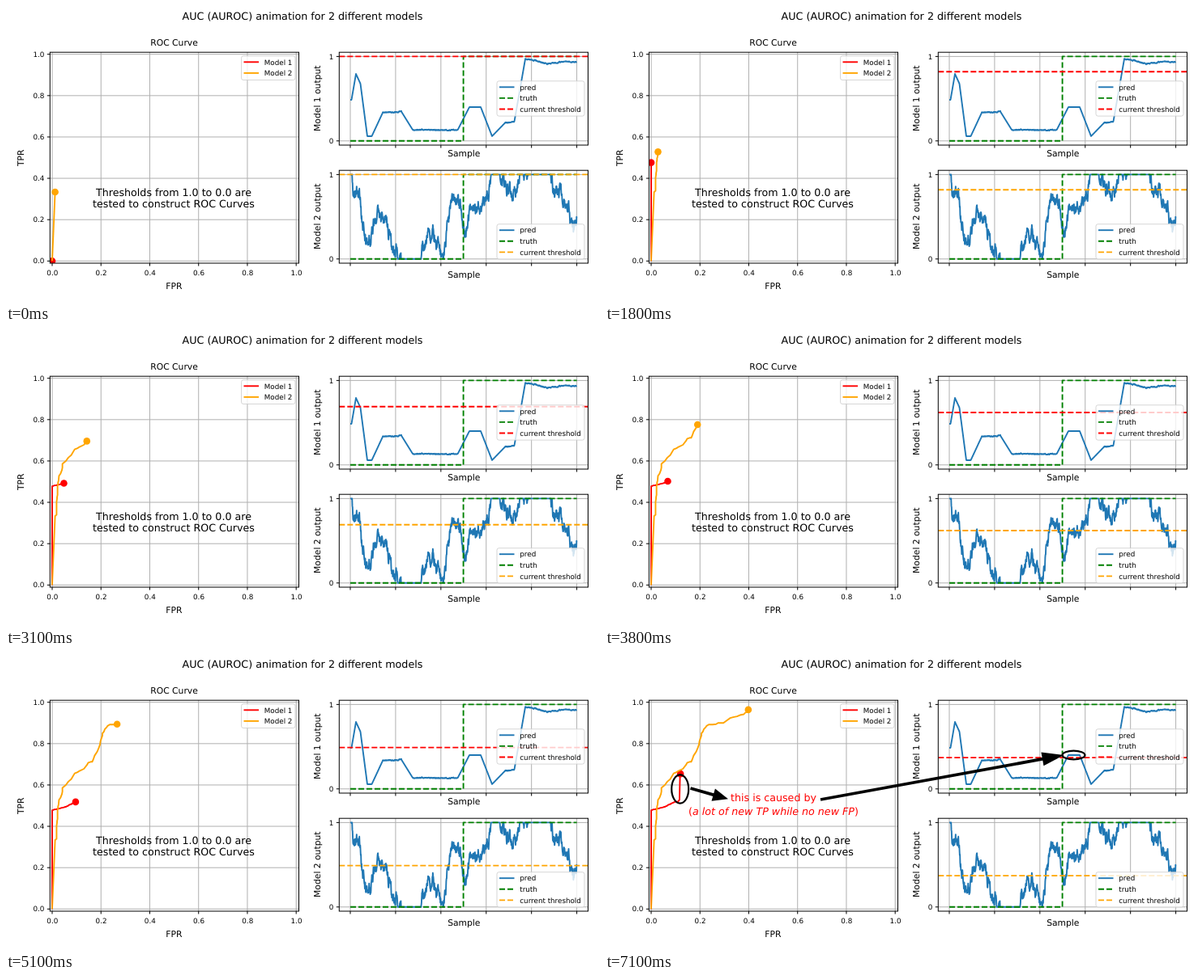
These frames come from a looping animation (732 px wide and 366 px high, 8 s). An HTML page:

```html
<!DOCTYPE html>
<html lang="en">
<head>
<meta charset="utf-8">
<title>ROC animation</title>
<style>
  html, body { margin: 0; width: 100%; height: 100%; overflow: hidden; background: #fff; }
  svg { display: block; width: 100%; height: 100%; }
  text { font-family: "DejaVu Sans", sans-serif; text-rendering: geometricPrecision; }
</style>
</head>
<body>
<svg id="stage" viewBox="0 0 732 366"></svg>
<script>
const LOOP = 8000, STEP = 100, LAST = 63;
const BLUE = '#1f77b4', GREEN = '#008000', RED = '#ff0000', ORANGE = '#ffa500';
const BIG = 12.67, MID = 10.75, SMALL = 8.75, LINE = 1.9;
const SAMPLES = 1000, X0 = 425, X1 = 704.6, UNIT = 104.4, MARGIN = 5.2;
const TOP1 = 57.2, TOP2 = 203.2;
const stage = document.getElementById('stage');

function add(tag, attrs, parent = stage) {
  const el = document.createElementNS('http://www.w3.org/2000/svg', tag);
  for (const key in attrs) el.setAttribute(key, attrs[key]);
  parent.appendChild(el);
  return el;
}

function label(str, x, y, size, extra = {}, parent = stage) {
  const el = add('text', { x, y, 'font-size': size, 'text-anchor': 'middle', ...extra }, parent);
  el.textContent = str;
  return el;
}

const upright = (str, x, y, size) =>
  label(str, 0, 0, size, { transform: `translate(${x} ${y}) rotate(-90)` });

const path = (d, stroke, width, extra = {}, parent = stage) =>
  add('path', { d, stroke, 'stroke-width': width, fill: 'none', 'stroke-linejoin': 'round', ...extra }, parent);

const toPath = pts => 'M' + pts.map(p => p[0].toFixed(2) + ' ' + p[1].toFixed(2)).join('L');
const dashes = { 'stroke-dasharray': '7 3' };
const atEnd = { 'text-anchor': 'end' };

function axes(left, top, height, xs, ys) {
  const right = left + 307.2, bottom = top + height, id = `clip${left}-${top}`;
  const box = { x: left, y: top, width: 307.2, height };
  add('rect', box, add('clipPath', { id }));
  let grid = '', ticks = '';
  for (const x of xs) { grid += `M${x} ${top}V${bottom}`; ticks += `M${x} ${bottom}v3.5`; }
  for (const y of ys) { grid += `M${left} ${y}H${right}`; ticks += `M${left} ${y}h-3.5`; }
  path(grid, '#b0b0b0', 1);
  path(ticks, '#000', 1);
  const plot = add('g', { 'clip-path': `url(#${id})` });
  add('rect', { ...box, fill: 'none', stroke: '#000' });
  return plot;
}

function legend(x, y, width, rows) {
  const height = 2.5 + rows.length * 13.6;
  add('rect', { x, y, width, height, rx: 2.5, fill: '#fff', 'fill-opacity': 0.8, stroke: '#ccc', 'stroke-opacity': 0.8 });
  rows.forEach(([name, color, dashed], i) => {
    const cy = y + 7.5 + i * 13.6;
    path(`M${x + 3} ${cy}h18.5`, color, LINE, dashed ? dashes : {});
    label(name, x + 28.3, cy + 3.2, SMALL, { 'text-anchor': 'start' });
  });
}

function randomizer(seed) {
  return () => (seed = (seed * 16807) % 2147483647) / 2147483647 - 0.5;
}

// Samples a coarse outline evenly, with correlated noise on parts flatter than `steepest`.
function signal(keys, top, { seed, amp, keep, steepest }) {
  const rnd = randomizer(seed), one = top + MARGIN;
  let noise = 0, seg = 0;
  return Array.from({ length: SAMPLES }, (_, i) => {
    const x = X0 + (X1 - X0) * i / (SAMPLES - 1);
    while (seg < keys.length - 2 && keys[seg + 1][0] < x) seg++;
    const [xa, ya] = keys[seg], [xb, yb] = keys[seg + 1];
    const slope = (yb - ya) / (xb - xa);
    const smooth = slope === 0 && steepest < 1 || Math.abs(slope) > steepest;
    noise = smooth ? 0 : noise * keep + rnd() * amp;
    const y = ya + slope * (x - xa) + noise;
    return [x, Math.min(one + UNIT, Math.max(one, y))];
  });
}

// Share of samples above each threshold, as points in the ROC panel.
function rocPoints(pts, top) {
  const half = SAMPLES / 2;
  return Array.from({ length: LAST + 1 }, (_, k) => {
    const limit = top + MARGIN + UNIT * k / 100 + 0.01;
    const share = part => part.filter(p => p[1] <= limit).length / half;
    return [57 + 301.2 * share(pts.slice(0, half)), 315.3 - 255.6 * share(pts.slice(half))];
  });
}

const out1 = signal([
  [425, 116], [426.5, 116], [432, 84], [437.5, 96], [446, 161], [451.5, 161], [465, 132], [488, 130.5],
  [502, 153], [557.5, 153.4], [572, 125], [586, 125], [600, 161], [616, 144.5], [627.5, 142.8],
  [641, 65.5], [656, 68], [668, 71.5], [688, 68.8], [704.6, 69.2]
], TOP1, { seed: 11, amp: 0.9, keep: 0.75, steepest: 0.7 });

const out2 = signal([
  [425, 208], [431, 234], [436, 238], [440, 276], [449, 288], [453, 268], [470, 260], [476, 300],
  [488, 315], [498, 330], [510, 322], [516, 295], [523, 276], [528, 278], [537, 311], [545, 272],
  [550, 236], [560, 243], [566, 284], [577, 250], [587, 250], [593, 234], [602, 200], [610, 200],
  [621, 233], [630, 232], [637, 206], [645, 211], [649, 198], [667, 198], [675, 228], [690, 236],
  [703, 282], [704.6, 264]
], TOP2, { seed: 77, amp: 13, keep: 0.83, steepest: Infinity });

label('AUC (AUROC) animation for 2 different models', 366, 17, 12.74);

// ROC panel
const fifths = [0, 1, 2, 3, 4, 5];
const rocX = fifths.map(i => 57 + i * 60.24);
const rocY = fifths.map(i => 315.3 - i * 51.12);
const roc = axes(54.3, TOP1, 260.8, rocX, rocY);
fifths.forEach(i => {
  const str = (i / 5).toFixed(1);
  label(str, rocX[i] + 0.3, 332.5, SMALL);
  label(str, 47.3, rocY[i] + 3, SMALL, atEnd);
});
label('ROC Curve', 207.5, 49.3, MID);
label('FPR', 207.3, 349.8, MID);
upright('TPR', 22, 187.8, MID);
label('Thresholds from 1.0 to 0.0 are', 207, 234.5, BIG);
label('tested to construct ROC Curves', 207, 248.7, BIG);

const rocCurve = (color, pts) => ({
  pts,
  line: path('', color, LINE, {}, roc),
  dot: add('circle', { r: 4.3, fill: color }, roc)
});
const curves = [
  rocCurve(RED, rocPoints(out1, TOP1)),
  rocCurve(ORANGE, rocPoints(out2, TOP2))
];
legend(290.5, 61.8, 66.5, [['Model 1', RED], ['Model 2', ORANGE]]);

// Output panels
function outputPanel(n, top, color, pts, sampleY, legendY) {
  const one = top + MARGIN, zero = one + UNIT;
  const plot = axes(411.3, top, UNIT + 2 * MARGIN, fifths.map(i => X0 + i * (X1 - X0) / 5), [one, zero]);
  label('1', 404.3, one + 3.3, SMALL, atEnd);
  label('0', 404.3, zero + 3.3, SMALL, atEnd);
  label('Sample', 565.3, sampleY, MID);
  upright(`Model ${n} output`, 387.7, top + 57, MID);
  path(toPath(pts), BLUE, LINE, {}, plot);
  path(`M${X0} ${zero}H564.6V${one}H${X1}`, GREEN, LINE, dashes, plot);
  const line = path(`M411.3 ${one}H718.5`, color, LINE, dashes, plot);
  legend(606, legendY, 108, [['pred', BLUE], ['truth', GREEN, true], ['current threshold', color, true]]);
  return line;
}

const lines = [
  outputPanel(1, TOP1, RED, out1, 186, 92.8),
  outputPanel(2, TOP2, ORANGE, out2, 335.8, 269.7)
];

// Closing remarks
const notes = add('g', {});
function arrow(x0, y0, x1, y1, head, half) {
  const len = Math.hypot(x1 - x0, y1 - y0), ux = (x1 - x0) / len, uy = (y1 - y0) / len;
  const bx = x1 - ux * head, by = y1 - uy * head;
  path(`M${x0} ${y0}L${bx + ux} ${by + uy}`, '#000', 3.8, {}, notes);
  add('path', { d: `M${x1} ${y1}L${bx - uy * half} ${by + ux * half}L${bx + uy * half} ${by - ux * half}Z` }, notes);
}
const ring = (cx, cy, rx, ry) =>
  add('ellipse', { cx, cy, rx, ry, fill: 'none', stroke: '#000', 'stroke-width': 2.2 }, notes);

ring(92.7, 167, 10.5, 17.6);
ring(578.5, 125, 14, 5.4);
arrow(105.5, 166, 152, 179.3, 19, 8);
arrow(266, 180, 566.5, 125, 27, 8.5);
label('this is caused by', 208, 182.2, BIG, { fill: RED }, notes);
const remark = label('(', 208, 199.1, BIG, { fill: RED }, notes);
add('tspan', { 'font-style': 'italic' }, remark).textContent = 'a lot of new TP while no new FP';
add('tspan', {}, remark).textContent = ')';

function draw(now) {
  const k = Math.min(LAST, Math.floor((now % LOOP) / STEP));
  for (const { pts, line, dot } of curves) {
    line.setAttribute('d', toPath([[57, 315.3], ...pts.slice(0, k + 1)]));
    dot.setAttribute('cx', pts[k][0]);
    dot.setAttribute('cy', pts[k][1]);
  }
  for (const line of lines) line.setAttribute('transform', `translate(0 ${k * UNIT / 100})`);
  notes.setAttribute('visibility', k === LAST ? 'visible' : 'hidden');
}

let start;
function tick(now) {
  start ??= now;
  draw(now - start);
  requestAnimationFrame(tick);
}
draw(0);
requestAnimationFrame(tick);
</script>
</body>
</html>
```
